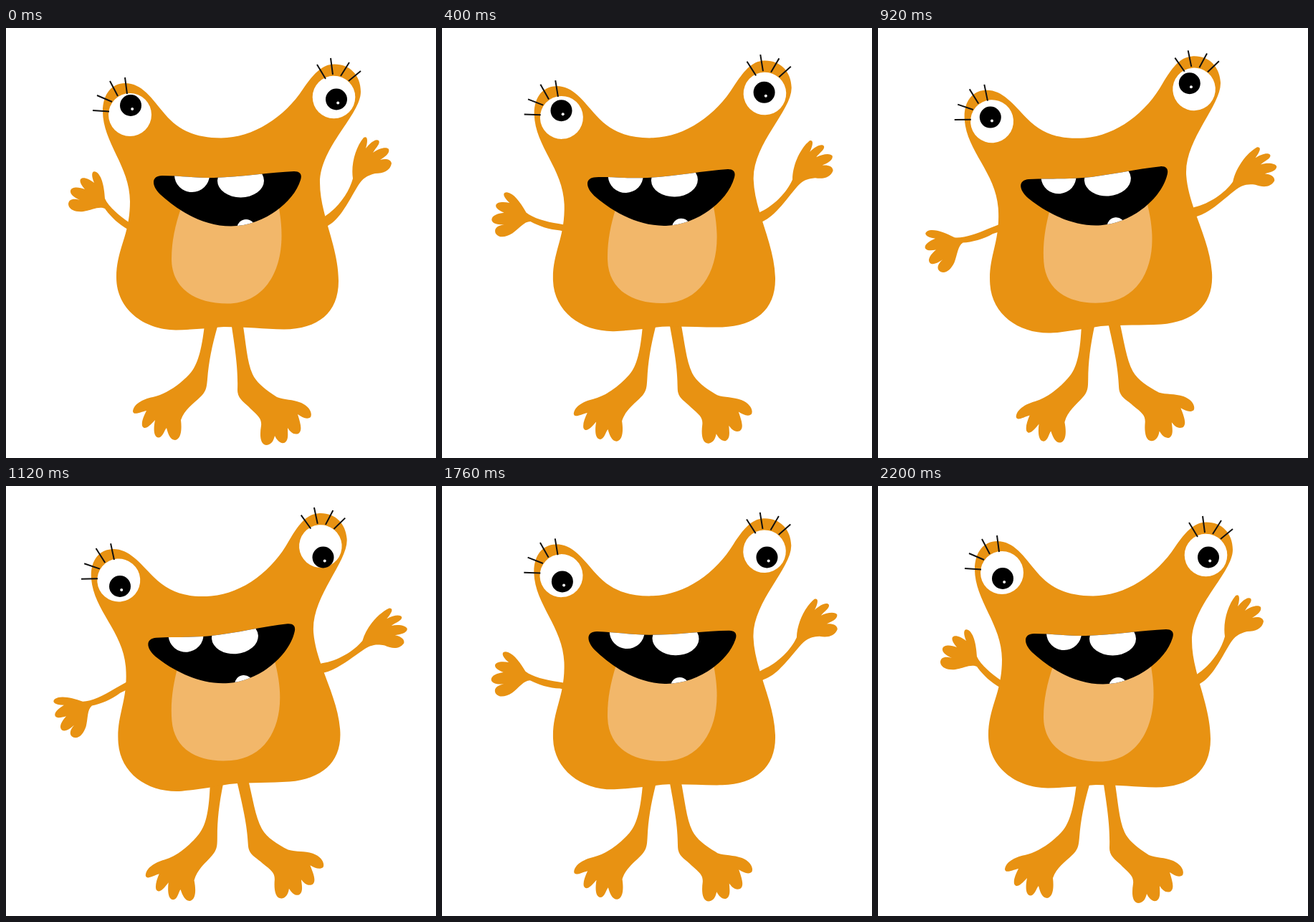
Recreate the animation shown at these times as an HTML page. Size 600 px wide and 600 px high, loop 2.24 s.

```html
<!DOCTYPE html>
<html lang="en">
<head>
<meta charset="utf-8">
<title>Waving monster</title>
<style>
  html, body { margin: 0; width: 100%; height: 100%; overflow: hidden; background: #fff; }
  svg { display: block; width: 100%; height: 100%; }
  .skin { fill: #e89212; }
  .belly { fill: #f2b76a; }
  .white { fill: #fff; }
  .lash { fill: none; stroke: #111; stroke-width: 2; }
</style>
</head>
<body>
<svg viewBox="0 0 600 600">
  <defs>
    <path id="lips" d="M218 206C240 206 260 209 290 209C330 208 370 201 402 200C412 200 413 206 411 212C401 245 357 276.5 314 276.5C275 276.5 240 255 215 232C202 219 203 206 218 206Z"/>
    <clipPath id="inside"><use href="#lips"/></clipPath>
  </defs>

  <path id="armL" class="skin" d="M190 285L172 271.5C158 262 143 249 138 238C137 222 134 206 126 201C120 198 118 204 123 216C115 210 107 207 104 211C102 215 106 220 110 225C102 222 92 221 90 227C89 233 97 237 103 240C94 237 87 239 87 246C88 254 97 257 108 256C120 254 130 248 138 252C145 262 157 274 170 281L186 295Z"/>
  <path id="armR" class="skin" d="M430 275L446 262C464 250 479 229 484 210C481 190 488 166 499 153C505 150 505 158 502 168C508 160 516 154 520 157C523 161 516 167 512 174C520 168 531 165 534 169C536 175 528 180 522 184C530 182 537 183 538 189C536 199 527 203 515 203C503 206 497 210 490 222C479 240 467 266 449 276L434 289Z"/>

  <g id="body">
    <path class="skin" d="M277 415C273 448 268 470 256 483C240 500 222 511 205 515C190 518 178 525 177 535C178 541 187 536 196 534C192 542 189 549 190 555C193 562 200 556 208 547C206 557 205 571 213 571.5C219 571 221 561 224 558C226 566 229 575 236 575C243 574 246 564 244 547C249 532 262 524 272 514C280 506 280 500 281 490C283 465 287 445 295.5 415Z"/>
    <path class="skin" d="M314 410C320 450 324 475 323 505C323 518 333 522 341 531C353 542 357 546 356 555C354 567 354 582 364 582C372 581 374 573 375 569C378 575 382 580 388 579C395 576 393 565 393 558C397 564 401 568 408 566C414 562 411 552 407 539C413 543 420 547 425 543C428 537 423 528 412 523C400 518 388 519 378 515C364 506 350 496 344 483C336 465 335 440 330 410Z"/>
    <path class="skin" d="M166 77C190 77 203 98 222 120.5S265 153.4 300 153.4C345 153.4 389 124 414.5 85C428 66 440 50.5 458 50.5C480 50.5 495 66 495 89C495 121 438 166 438 216C438 260 464 305 464 353C464 398 435 420 388 420.5C360 420 335 417 304 417C280 419 260 421 237 421.5C192 421 154 392 154 348C154 308 173 290 173 242C173 193 135 160 135 116C135 92 148 77 166 77Z"/>
    <path class="belly" d="M250 235C240 262 231 290 231 322C231 362 262 384.5 309 384.5C358 384.5 384.5 343 384.5 290C384.5 275 383 262 379 240Z"/>
    <circle class="white" cx="173" cy="121" r="30"/>
    <circle class="white" cx="457.5" cy="96.5" r="29.8"/>
    <path class="lash" d="M121 115L144 116.5M127 94L148 103M145 74L156 95M166 69L169 92M434 51L446 71M453 42L456 65M479 48L467 67M495 60L478 74"/>
  </g>

  <g id="mouth">
    <use href="#lips"/>
    <g class="white" clip-path="url(#inside)">
      <ellipse cx="259.5" cy="205" rx="24.5" ry="24"/>
      <ellipse cx="327.5" cy="213" rx="32.5" ry="23.5"/>
      <ellipse cx="335" cy="279" rx="12.5" ry="12"/>
    </g>
  </g>

  <g id="pupilL"><circle r="15"/><circle class="white" cx="2.2" cy="5" r="2"/></g>
  <g id="pupilR"><circle r="15"/><circle class="white" cx="2.2" cy="5" r="2"/></g>
</svg>
<script>
const STEP = 40, HALF = 28, STEPS = 2 * HALF;
const REACH = 26; // steps until the outward lean is complete

// Straight pupil paths: [x1, y1, x2, y2] while leaning out, then back.
const gaze = {
  pupilL: [[174, 108, 153.8, 127.5], [159, 140, 174, 129]],
  pupilR: [[461, 99.5, 430.2, 73.4], [442.5, 99.5, 461, 99.5]]
};

const move = (id, value) => document.getElementById(id).setAttribute('transform', value);
const turn = (angle, x, y) => `rotate(${angle} ${x} ${y})`;
const mix = (a, b, k) => a + (b - a) * k;

function pose(i) {
  const back = i >= HALF;
  const k = (i % HALF) / (HALF - 1);
  const lean = back ? 1 - k : Math.min(1, i / REACH);

  move('body', turn(-4.65 * lean, 294.5, 320));
  move('armL', turn(-66.5 * lean, 170.5, 293));

  // The right arm and mouth switch paths one step after the turning point.
  const late = i > HALF;
  const swing = late ? lean : i / HALF;
  const slide = late ? `translate(${12.7 * swing} ${-1.3 * swing}) ` : '';
  move('armR', slide + turn(24.7 * swing, 477.1, 243.4));
  move('mouth', late ? turn(3.7 * lean, 335, 155) : turn(-4.2 * lean, 292, 322));

  for (const id in gaze) {
    const [x1, y1, x2, y2] = gaze[id][+back];
    move(id, `translate(${mix(x1, x2, k)} ${mix(y1, y2, k)})`);
  }
}

function tick() {
  pose(Math.floor(performance.now() / STEP) % STEPS);
  requestAnimationFrame(tick);
}
pose(0);
requestAnimationFrame(tick);
</script>
</body>
</html>
```
